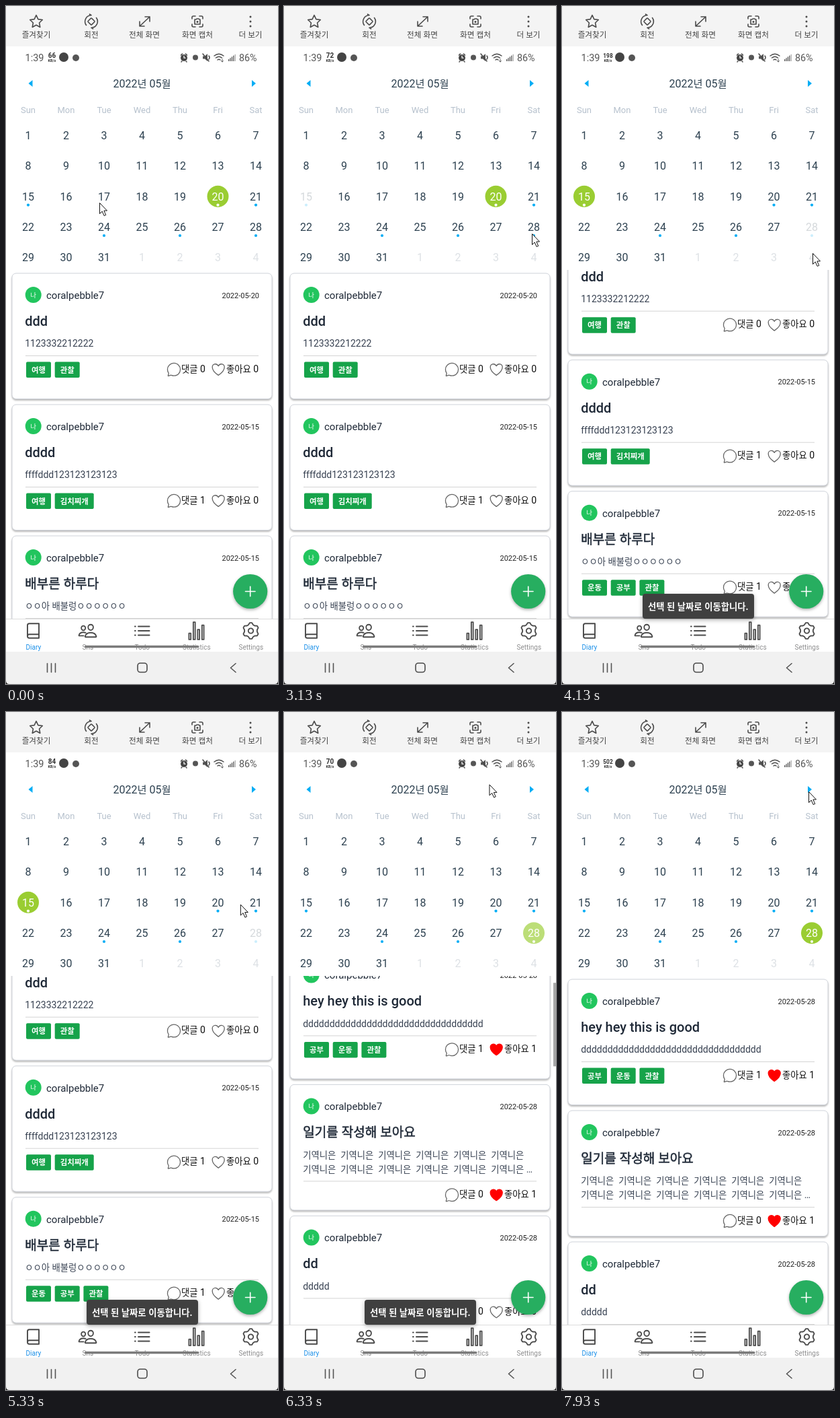
An HTML page for the animation above (8 s loop, 405 by 1007 pixels).

```html
<!DOCTYPE html>
<html lang="ko">
<head>
<meta charset="utf-8">
<title>Diary calendar</title>
<style>
html, body { margin: 0; width: 100%; height: 100%; overflow: hidden; background: #222 }
svg { display: block; width: 100vw; height: 100vh }
text { font-family: Roboto, 'Noto Sans CJK KR', 'Noto Sans CJK', sans-serif; white-space: pre }
.k { font-size: .953em }
.title { font-weight: 500 }
.title .k { font-weight: 400; stroke: #1f2937; stroke-width: .5px }
.bold { font-weight: 700 }
.mid { text-anchor: middle }
.end { text-anchor: end }
.line { fill: none; stroke: #4b4b4b; stroke-width: 1.6; stroke-linecap: round; stroke-linejoin: round }
.disc { fill: none }
.dot { fill: #00adf5 }
.sel .disc { fill: #9acd32 }
.sel text, .sel .dot { fill: #fff }
.card { fill: #fff; stroke: #cfd3da; filter: drop-shadow(0 2px 1.2px rgba(0,0,0,.27)) }
.fab { fill: #27ae60; filter: drop-shadow(0 2px 2px rgba(0,0,0,.3)) }
#toast rect { fill: #404040; filter: drop-shadow(0 2px 3px rgba(0,0,0,.3)) }
</style>
</head>
<body>
<svg id="stage" viewBox="0 0 405 1007" preserveAspectRatio="none"></svg>
<script>
const LOOP = 8000, USER = 'coralpebble7';

// ---- drawing helpers ----
const text = (x, y, size, s, fill = '#222', cls = '') =>
  `<text x="${x}" y="${y}" font-size="${size}" fill="${fill}" class="${cls}">` +
  String(s).replace(/[ㄱ-힣]+/g, '<tspan class="k">$&</tspan>') + '</text>';
const rect = (x, y, w, h, fill, r = 0, more = '') =>
  `<rect x="${x}" y="${y}" width="${w}" height="${h}" rx="${r}" fill="${fill}" ${more}/>`;
const disc = (x, y, r, fill, cls = '') => `<circle cx="${x}" cy="${y}" r="${r}" fill="${fill}" class="${cls}"/>`;
const line = (d, more = '') => `<path class="line" d="${d}" ${more}/>`;
// An outline drawn in a square box, centred on x, y
const icon = (x, y, scale, d, style, box = 512) =>
  line(d, `transform="translate(${x} ${y}) scale(${scale}) translate(${-box / 2} ${-box / 2})" style="${style}"`);
const polar = (cx, cy, n, radius, turn = -Math.PI / 2) => 'M' + Array.from({ length: n }, (_, i) => {
  const a = turn + i * 2 * Math.PI / n, r = radius(i);
  return `${(cx + r * Math.cos(a)).toFixed(2)} ${(cy + r * Math.sin(a)).toFixed(2)}`;
}).join('L') + 'Z';

// ---- top toolbar and status bar ----
function toolbar() {
  const labels = [[45, '즐겨찾기'], [127, '회전'], [206, '전체 화면'], [285, '화면 캡처'], [364, '더 보기']];
  return rect(0, 0, 405, 60, '#f4f4f4') +
    labels.map(([x, s]) => text(x, 47, 12.2, s, '#444', 'mid')).join('') +
    line(polar(45, 23.5, 10, i => i % 2 ? 4.8 : 9.8)) +
    rect(123.2, 19.2, 7.6, 7.6, 'none', 1, 'class="line" transform="rotate(45 127 23)"') +
    line('M119.500 28.500A9.300 9.300 0 0 1 127 13.700l-2.500-1.500M134.500 17.500A9.300 9.300 0 0 1 127 32.300l2.500 1.500') +
    line('M199 30L214 16M207 16h7v7M199 23v7h7') +
    line('M277 19v-2q0-2 2-2h3M288 15h3q2 0 2 2v2M293 27v2q0 2-2 2h-3M282 31h-3q-2 0-2-2v-2M281 20h2l1-1h3l1 1h1v7h-8z') +
    disc(285, 23.5, 1.5, '#4b4b4b') +
    [16, 23, 30].map(y => disc(364, y, 1.5, '#4b4b4b')).join('');
}

function statusBar() {
  const c = '#555';
  return text(28.5, 81.5, 14.5, '1:39', c) +
    `<text id="rate" x="68.5" y="77" class="mid bold" fill="#333"></text>` +
    text(68.5, 83, 5.5, 'KB/s', '#333', 'mid bold') +
    disc(86, 76, 7, '#444') + disc(104, 77, 5, '#555') +
    disc(265, 77, 5, '#444') +
    line('M265 74v3.2h2', 'style="stroke:#fff;stroke-width:1.2"') +
    line('M260.5 73l2-2M269.5 73l-2-2M262 82l-1 1M268 82l1 1') +
    disc(282, 76.5, 4, '#555') +
    `<path d="M293 74.500h3l4-3.500v11l-4-3.500h-3z" fill="${c}"/>` +
    line('M293 71l9 11M302 74q2 2.500 0 5') +
    line('M310 74q7-5.500 14 0M312.500 77q4.500-3.500 9 0M315 80q2-1.500 4 0', 'style="stroke-width:1.4"') +
    line('M322 79v4M320.500 81.500l1.500 1.500l1.500-1.500', 'style="stroke-width:.9"') +
    [0, 1, 2, 3, 4].map(i => rect(331 + i * 2.4, 79 - i * 1.8, 1.3, 3 + i * 1.8, i < 4 ? c : '#aaa')).join('') +
    text(347, 81.5, 14.3, '86%', c);
}

// ---- calendar ----
function calendar() {
  const marked = [15, 20, 21, 24, 26, 28];
  let out = rect(0, 60, 405, 332, '#fff') +
    text(202.5, 121, 16, '2022년 05월', '#2d4150', 'mid') +
    '<path d="M39.500 110v10l-6-5zM366 110v10l6-5z" fill="#00adf5"/>';
  'Sun Mon Tue Wed Thu Fri Sat'.split(' ').forEach((s, i) =>
    out += text(33 + i * 56.5, 159.2, 13, s, '#b6c1cd', 'mid'));
  for (let i = 0; i < 35; i++) {
    const x = 33 + i % 7 * 56.5, y = 192 + (i / 7 | 0) * 45.4, n = i + 1, off = n > 31;
    out += `<g id="day${n}">` + disc(x, y, 16, 'none', 'disc') +
      text(x, y + 5.7, 16, off ? n - 31 : n, off ? '#dde1e5' : '#2d4150', 'mid') +
      (marked.includes(n) ? disc(x, y + 12.8, 2.1, '#00adf5', 'dot') : '') + '</g>';
  }
  return out;
}

// ---- diary cards ----
const BUBBLE = 'M87 380c2-4-1-10-4-15a200 200 0 0 1-35-114C48 139 141 48 256 48C371 48 464 139 464 251C464 364 374 456 259 456c-25 0-60-8-87-18q-12-5-23 0l-68 24q-15 2-14-10z';
const HEART = 'M353 80C288 80 256 144 256 144s-32-64-97-64c-53 0-95 44-95 97c-1 109 87 187 183 252q9 6 18 0c96-65 184-143 183-252c0-53-42-97-95-97z';

function card(c, i) {
  const extra = c.body.length > 1 ? 21 : 0;
  let x = 30, tags = '';
  for (const s of c.tags) {
    const w = 16 + s.length * 10.5;
    tags += rect(x, 131.5, w, 23.5, '#16a34a', 2) + text(x + w / 2, 147.6, 12, s, '#fff', 'mid bold');
    x += w + 5.7;
  }
  return `<g transform="translate(0 ${397 + i * 195})">` +
    '<rect class="card" x="9" y="0" width="387" height="186.500" rx="6"/>' +
    disc(40.7, 32, 12, '#22c55e') + text(40.7, 35.6, 10, '나', '#fff', 'mid') +
    text(60, 38, 15, USER, '#1f2937') +
    text(377, 36.7, 11, '2022-05-' + c.day, '#222', 'end') +
    text(28.2, 78, 20, c.title, '#1f2937', 'title') +
    c.body.map((s, j) => text(28.2, 109.3 + j * 21, 14, s, '#374151')).join('') +
    rect(29, 122 + extra, 347, 1, '#d4d4d4') + tags +
    `<g transform="translate(0 ${extra})">` +
    icon(250, 143, .046, BUBBLE, 'stroke:#666;stroke-width:28') +
    text(261, 146.7, 14, '댓글 ' + c.notes, '#111') +
    icon(316.2, 143, .047, HEART, c.likes ? 'fill:red;stroke:red;stroke-width:28' : 'stroke:#666;stroke-width:28') +
    text(328, 146.7, 14, '좋아요 ' + c.likes, '#111') + '</g></g>';
}

const entry = (day, title, body, tags, notes, likes) => ({ day, title, body: [].concat(body), tags, notes, likes });
const words = Array(6).fill('기역니은').join('  ');
const before = [
  entry(20, 'ddd', '1123332212222', ['여행', '관찰'], 0, 0),
  entry(15, 'dddd', 'ffffddd123123123123', ['여행', '김치찌개'], 1, 0),
  entry(15, '배부른 하루다', 'ㅇㅇ아 배불렁ㅇㅇㅇㅇㅇㅇ', ['운동', '공부', '관찰'], 1, 0)
];
const after = [
  entry(28, 'hey hey this is good', 'd'.repeat(34), ['공부', '운동', '관찰'], 1, 1),
  entry(28, '일기를 작성해 보아요', [words, words + ' …'], [], 0, 1),
  entry(28, 'dd', 'ddddd', [], 0, 0)
];

// ---- bottom bars ----
const BOOK = 'M4 19.500A2.500 2.500 0 0 1 6.500 17H20M6.500 2H20v20H6.500A2.500 2.500 0 0 1 4 19.500v-15A2.500 2.500 0 0 1 6.500 2z';
const PEOPLE = 'M402 168c-3 41-33 72-66 72s-63-31-66-72c-3-42 26-72 66-72s69 30 66 72z' +
  'M336 304c-65 0-128 32-144 95q-2 17 12 17h264q14 0 12-17C464 335 401 304 336 304z' +
  'M200 186c-2 32-27 58-53 58s-51-26-53-58C92 152 115 128 147 128s55 25 53 58z' +
  'M206 306c-18-8-38-11-59-11c-52 0-102 26-115 76q-1 13 10 13H154';
const LIST = 'M160 144H448M160 256H448M160 368H448M72 144h16M72 256h16M72 368h16';
const BARS = 'M64 320h48v160H64zM176 32h48v448h-48zM288 224h48v256h-48zM400 112h48v368h-48z';

function bottom() {
  const tabs = ['Diary', 'Sns', 'Todo', 'Statistics', 'Settings'];
  const gear = polar(256, 256, 24, i => i % 4 < 2 ? 208 : 164, -Math.PI * 13 / 24) + polar(256, 256, 32, () => 64);
  return '<circle class="fab" cx="363.700" cy="869.500" r="25.600"/>' +
    line('M356.500 869.500h14.500M363.700 862.200v14.500', 'style="stroke:#fff"') +
    rect(0, 910, 405, 49, '#fff') + rect(0, 910, 405, 1, '#dcdcdc') +
    icon(40.5, 928, 1.067, BOOK, 'stroke-width:1.8', 24) +
    [PEOPLE, LIST, BARS, gear].map((d, i) => icon(121.5 + i * 81, 928, .0577, d, 'stroke-width:32')).join('') +
    tabs.map((s, i) => text(40.8 + i * 81, 956, 10, s, i ? '#8e8e8f' : '#1a8fe8', 'mid')).join('') +
    rect(117, 949.7, 170, 3.6, '#7b7b7b', 1.8) +
    '<path d="M0 959H405V1002q0 5-5 5H5q-5 0-5-5z" fill="#f1f1f1"/>' +
    line('M61.500 976.500v13M67.500 976.500v13M73.500 976.500v13M342 976.500l-7.500 6.500l7.500 6.500', 'style="stroke:#555"') +
    rect(196, 976, 14, 13.5, 'none', 4, 'class="line"');
}

document.getElementById('stage').innerHTML =
  '<clipPath id="view"><rect y="392" width="405" height="518"/></clipPath>' +
  rect(0, 0, 405, 1002, '#fff') +
  `<g clip-path="url(#view)"><g id="before">${before.map(card).join('')}</g>` +
  `<g id="after">${after.map(card).join('')}</g>` +
  rect(401, 393, 4, 124, '#a8a8a8', 0, 'id="bar"') + '</g>' +
  calendar() + toolbar() + statusBar() + bottom() +
  `<g id="toast">${rect(120, 873, 166, 37, '', 4)}${text(202.8, 896.7, 14, '선택 된 날짜로 이동합니다.', '#fff', 'mid bold')}</g>` +
  '<path id="cursor" d="M-.5 .5V16.500L3.200 13L6.100 19.500L8.700 18.400L5.900 12H10.500Z" fill="#fff" stroke="#111" stroke-linejoin="round"/>';

// ---- motion: rows of [time, value, ...], linear between them ----
const track = (rows, t) => {
  const i = rows.findIndex(r => r[0] > t);
  if (i < 1) return rows[i < 0 ? rows.length - 1 : 0].slice(1);
  const a = rows[i - 1], b = rows[i], p = (t - a[0]) / (b[0] - a[0]);
  return a.slice(1).map((v, j) => v + (b[j + 1] - v) * p);
};
const cursorPath = [
  [70, 140, 292], [750, 30, 286], [930, 27, 287], [1060, 2, 296], [1600, 267, 351], [1730, 318, 350],
  [2200, 370, 338], [3670, 370, 338], [4130, 374, 367], [4270, 374, 367], [4500, 376, 345],
  [5070, 352, 292], [5300, 352, 292], [6200, 289, 104], [6470, 325, 111], [7000, 378, 114],
  [7200, 388, 116], [7600, 368, 118]
];
const press15 = [[930, 1], [1080, .2], [3270, .2], [3500, 1]];
const press28 = [[3720, 1], [3870, .2], [6200, .2], [6430, 1]];
const scrollPath = [[3270, 0], [3530, 66.3], [6260, 66.3], [6430, 0]];
const barFade = [[3260, 0], [3280, 1], [3750, 1], [4050, 0], [6250, 0], [6280, 1], [6700, 1], [6980, 0]];
const toastFade = [[3400, 0], [3530, 1], [6950, 1], [7100, 0]];
const rates = [66, 68, 73, 75, 72, 198, 84, 70, 502];

const $ = id => document.getElementById(id);
const [day15, day20, day28] = [15, 20, 28].map(n => $('day' + n));

function draw(t) {
  const scroll = track(scrollPath, t)[0], picked = t < 3270 ? day20 : t < 6180 ? day15 : day28;
  for (const d of [day15, day20, day28]) d.classList.toggle('sel', d === picked);
  day15.style.opacity = track(press15, t);
  day28.style.opacity = track(press28, t);

  $('before').style.display = t < 6260 ? '' : 'none';
  $('after').style.display = t < 6260 ? 'none' : '';
  for (const id of ['before', 'after']) $(id).setAttribute('transform', `translate(0 ${-scroll})`);
  $('bar').setAttribute('y', 393 + scroll * .24);
  $('bar').style.opacity = track(barFade, t);
  $('toast').style.opacity = track(toastFade, t);

  const rate = rates[Math.floor((t + 870) / 1000)];
  $('rate').textContent = rate;
  $('rate').setAttribute('font-size', rate > 99 ? 8.3 : 10);
  $('cursor').setAttribute('transform', `translate(${track(cursorPath, t)})`);
}

const start = performance.now();
(function tick() {
  draw((performance.now() - start) % LOOP);
  requestAnimationFrame(tick);
})();
</script>
</body>
</html>
```
